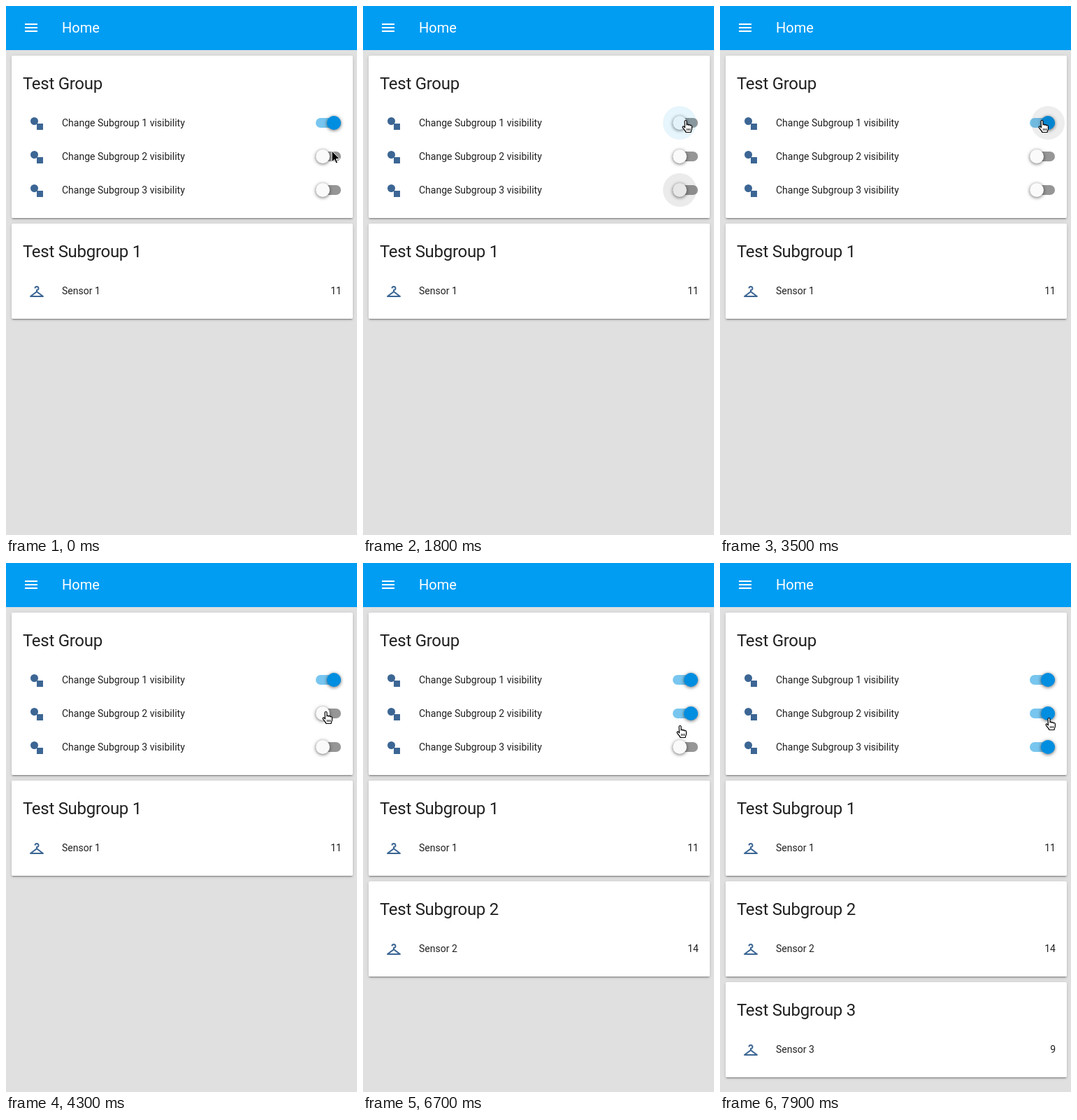
An HTML page that plays this animation: 502x756 px, repeating every 8 s.

```html
<!DOCTYPE html>
<html lang="en">
<head>
<meta charset="utf-8">
<title>Group visibility</title>
<style>
  html, body { margin: 0; width: 100%; height: 100%; overflow: hidden; }
  body { position: relative; background: #e0e0e0; color: #212121; font: 14px Roboto, sans-serif; }
  header { height: 63px; background: #009df3; color: #fff; font-size: 20px; line-height: 62px; text-indent: 80px; }
  header svg { position: absolute; left: 24px; top: 19px; }
  .card { margin: 8px 6px 0 8px; padding-bottom: 16px; background: #fff; border-radius: 2px;
    box-shadow: 0 2px 2px rgba(0,0,0,.14), 0 1px 5px rgba(0,0,0,.12), 0 3px 1px -2px rgba(0,0,0,.2); }
  .title { height: 72px; padding-left: 16px; font-size: 24px; line-height: 80px; letter-spacing: -.012em; }
  .row { position: relative; height: 48px; line-height: 48px; padding: 0 16px 0 72px; }
  .row svg { position: absolute; left: 24px; top: 13px; fill: #3c6694; }
  .value { float: right; }
  .bar { position: absolute; left: 435px; top: 17px; width: 36px; height: 14px; border-radius: 7px; background: #969696; }
  .knob { position: absolute; left: 0; top: -3px; width: 20px; height: 20px; border-radius: 50%;
    background: #fafafa; box-shadow: 0 1px 5px rgba(0,0,0,.6); }
  .on { background: #78c6ef; }
  .on .knob { left: 16px; background: #008ee0; }
  .ripple { position: absolute; left: -14px; top: -14px; width: 48px; height: 48px; border-radius: 50%; }
  #cursor { position: absolute; left: 0; top: 0; overflow: visible; }
</style>
</head>
<body>
<header><svg width="24" height="24" fill="#fff"><path d="M3 6h18v2H3zM3 11h18v2H3zM3 16h18v2H3z"/></svg>Home</header>
<main></main>
<svg id="cursor" width="1" height="1">
  <path id="arrow" d="M0 0V16L3.7 12.5 6 18 8.5 17 6.2 11.6H11.3Z" stroke="#fff"/>
  <g id="hand" transform="translate(-5 -1)" fill="#fff" stroke="#000" stroke-linejoin="round">
    <path stroke-width="1.2" d="M4 2C4 0 7 0 7 2V7C7 5.7 9.5 5.7 9.5 7.3 9.8 6.2 12 6.3 12 8 12.4 7.1 14.4 7.3 14.4 9.2V12C14.4 14 13 15 13 17.5H5.8C5.6 15.5 3 13.5 1.4 11.2 .3 9.4 2 8.3 3.3 9.6L4.4 10.8Z"/>
    <path stroke-width=".9" d="M7.4 12v3M9.5 12v3M11.6 12v3"/>
  </g>
</svg>
<script>
const LOOP = 8000, STEP = 100;
const shapes = 'M8.5 3A5.5 5.5 0 0 1 14 8.5C14 9.83 13.53 11.05 12.74 12H21V21H12V12.74C11.05 13.53 9.83 14 8.5 14A5.5 5.5 0 0 1 8.5 3Z';
const hanger = 'M12 4A3.5 3.5 0 0 0 8.5 7.5H10.5A1.5 1.5 0 1 1 12 9C11.45 9 11 9.45 11 10V11.75L2.4 18.2A1 1 0 0 0 3 20H21A1 1 0 0 0 21.6 18.2L13 11.75V10.85A3.5 3.5 0 0 0 12 4M12 13.5L18 18H6Z';

// switch index, press, release, moment the card follows, new state
const clicks = [
  { row: 0, down: 1490, up: 1720, card: 1900, on: false },
  { row: 0, down: 3190, up: 3380, card: 3500, on: true },
  { row: 1, down: 4990, up: 5220, card: 5300, on: true },
  { row: 2, down: 6890, up: 7120, card: 7200, on: true },
];
const focus = { row: 2, down: 650, up: 1850, on: true };
const startsOn = [true, false, false];

// time, x, y of the pointer's hot spot
const path = [
  [0, 466, 207], [500, 462, 164], [900, 462, 164], [1100, 461, 164], [2900, 461, 164],
  [3000, 460, 164], [3800, 460, 164], [4300, 457, 213], [6600, 457, 213], [6700, 453, 233],
  [6900, 457, 259], [7500, 457, 259], [7900, 470, 222], [LOOP, 470, 222],
];

const row = (icon, label, end) =>
  `<div class="row"><svg width="24" height="24"><path d="${icon}"/></svg>${label}${end}</div>`;
const card = (title, rows) => `<div class="card"><div class="title">${title}</div>${rows}</div>`;
const toggle = '<div class="bar"><div class="knob"><div class="ripple"></div></div></div>';

document.querySelector('main').innerHTML =
  card('Test Group', [1, 2, 3].map(n => row(shapes, `Change Subgroup ${n} visibility`, toggle)).join('')) +
  [11, 14, 9].map((value, i) => card(`Test Subgroup ${i + 1}`,
    row(hanger, `Sensor ${i + 1}`, `<span class="value">${value}</span>`))).join('');

const $ = id => document.getElementById(id);
const all = selector => [...document.querySelectorAll(selector)];
const bars = all('.bar'), ripples = all('.ripple'), cards = all('.card').slice(1);

function stateAt(i, t, moment) {
  return clicks.reduce((on, c) => c.row === i && t >= c[moment] ? c.on : on, startsOn[i]);
}

function drawRipple(el, i, t) {
  const press = [focus, ...clicks].filter(p => p.row === i && t >= p.down).pop();
  if (!press) return el.style.opacity = 0;
  const radius = Math.min(24, 80 * (1 - 80 ** (-(t - press.down) / 1047)));
  const peak = press === focus ? .09 : .125;
  el.style.background = press.on ? '#212121' : '#0090e0';
  el.style.transform = `scale(${radius / 24})`;
  el.style.opacity = Math.max(0, peak - Math.max(0, t - press.up) * .0004);
}

function drawCursor(t) {
  const k = path.findIndex(p => p[0] > t);
  const [t0, x0, y0] = path[k - 1], [t1, x1, y1] = path[k];
  const u = (t - t0) / (t1 - t0), e = u * u * (3 - 2 * u);
  $('cursor').style.transform = `translate(${x0 + (x1 - x0) * e}px, ${y0 + (y1 - y0) * e}px)`;
  $('arrow').style.display = t < 700 ? '' : 'none';
  $('hand').style.display = t < 700 ? 'none' : '';
}

function draw(now) {
  const t = Math.floor(now % LOOP / STEP) * STEP;
  for (let i = 0; i < 3; i++) {
    bars[i].classList.toggle('on', stateAt(i, t, 'up'));
    cards[i].style.display = stateAt(i, t, 'card') ? '' : 'none';
    drawRipple(ripples[i], i, t);
  }
  drawCursor(t);
}

const start = performance.now();
(function tick() {
  draw(performance.now() - start);
  requestAnimationFrame(tick);
})();
</script>
</body>
</html>
```
